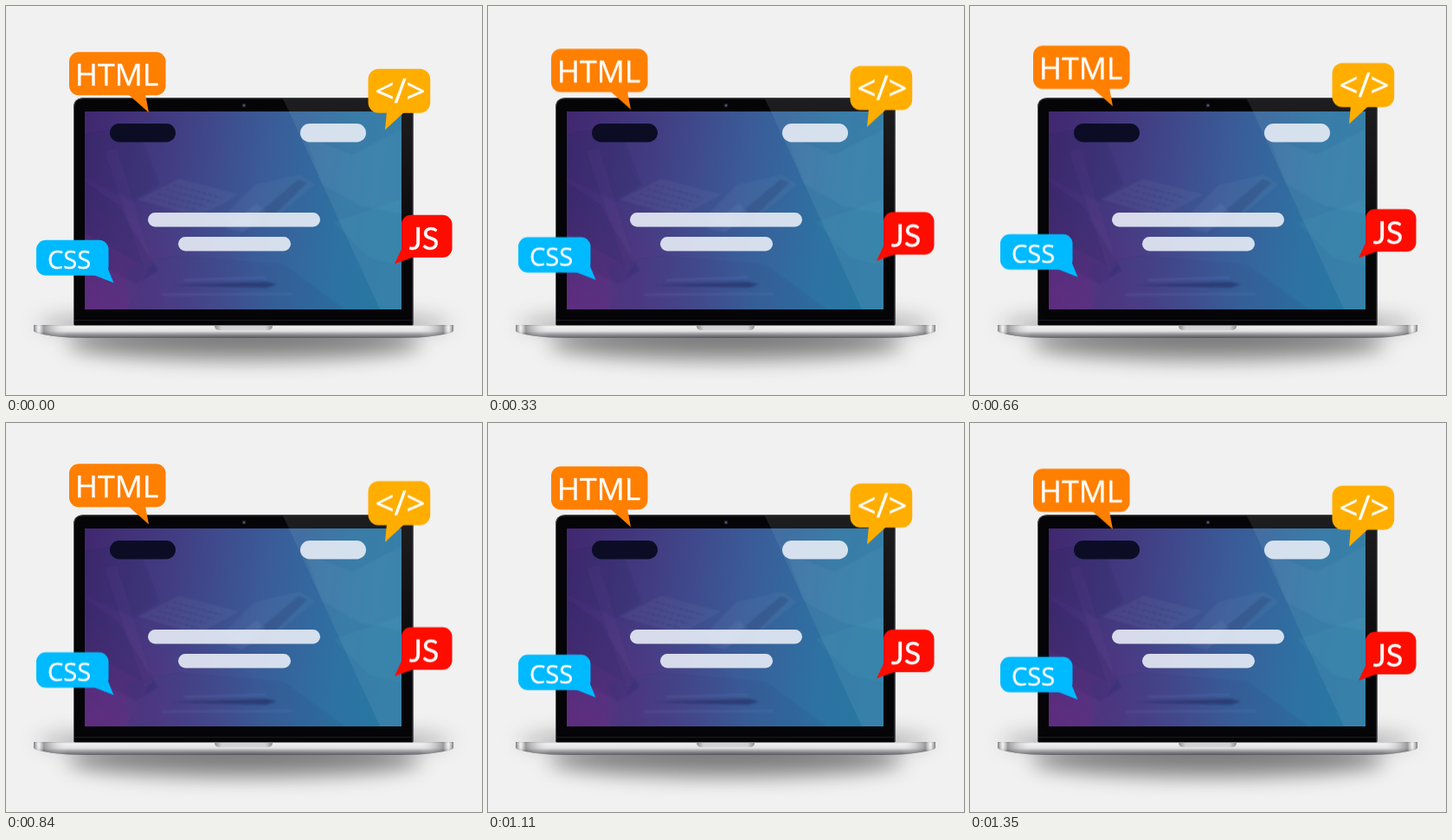
Recreate the animation shown at these times as an HTML page. Size 550 px wide and 450 px high, loop 1380 ms.

```html
<!DOCTYPE html>
<html lang="en">
<head>
<meta charset="utf-8">
<title>Web code laptop</title>
<style>
html, body { margin: 0; width: 100%; height: 100%; overflow: hidden; background: #f1f1f1; }
svg { display: block; width: 550px; height: 450px; }
text { fill: #fff; stroke: #fff; stroke-width: .4px; text-anchor: middle; font-family: "Open Sans", "Noto Sans", sans-serif; }
.js { font-family: Lato, sans-serif; }
/* 23 steps of 30 ms up, 23 down */
.bubble { animation: bob 1380ms infinite; }
@keyframes bob {
  0%, 100% { transform: translateY(0); animation-timing-function: steps(23); }
  50% { transform: translateY(var(--rise)); animation-timing-function: steps(23); }
}
</style>
</head>
<body>
<svg viewBox="0 0 550 450">
  <defs>
    <linearGradient id="tint" x1="0" y1="0" x2="1" y2=".08">
      <stop offset="0" stop-color="#41276f"/>
      <stop offset=".3" stop-color="#423e84"/>
      <stop offset=".6" stop-color="#3a5d99"/>
      <stop offset=".85" stop-color="#2d72a2"/>
      <stop offset="1" stop-color="#2877a3"/>
    </linearGradient>
    <radialGradient id="plum" cx="0" cy="1" r=".6">
      <stop offset="0" stop-color="#6b2c82" stop-opacity=".6"/>
      <stop offset="1" stop-color="#6b2c82" stop-opacity="0"/>
    </radialGradient>
    <linearGradient id="glare" x1="0" y1="0" x2="0" y2="1">
      <stop offset="0" stop-color="#fff" stop-opacity=".1"/>
      <stop offset=".45" stop-color="#fff" stop-opacity=".04"/>
      <stop offset=".75" stop-color="#fff" stop-opacity="0"/>
    </linearGradient>
    <linearGradient id="metal" x1="0" y1="0" x2="0" y2="1">
      <stop offset="0" stop-color="#bcbcbf"/>
      <stop offset=".12" stop-color="#f0f0f1"/>
      <stop offset=".48" stop-color="#dededf"/>
      <stop offset=".64" stop-color="#a8a8ac"/>
      <stop offset=".82" stop-color="#79797e"/>
      <stop offset="1" stop-color="#525258"/>
    </linearGradient>
    <linearGradient id="ends">
      <stop offset="0" stop-color="#55555a" stop-opacity=".75"/>
      <stop offset=".012" stop-color="#fff" stop-opacity=".5"/>
      <stop offset=".024" stop-color="#66666a" stop-opacity=".6"/>
      <stop offset=".08" stop-color="#fff" stop-opacity=".1"/>
      <stop offset=".5" stop-color="#fff" stop-opacity="0"/>
      <stop offset=".92" stop-color="#fff" stop-opacity=".1"/>
      <stop offset=".976" stop-color="#66666a" stop-opacity=".6"/>
      <stop offset=".988" stop-color="#fff" stop-opacity=".5"/>
      <stop offset="1" stop-color="#55555a" stop-opacity=".75"/>
    </linearGradient>
    <linearGradient id="notch">
      <stop offset="0" stop-color="#8e8e91"/>
      <stop offset=".12" stop-color="#d2d2d4"/>
      <stop offset=".88" stop-color="#d2d2d4"/>
      <stop offset="1" stop-color="#8e8e91"/>
    </linearGradient>
    <filter id="soft" x="-20%" y="-150%" width="140%" height="400%"><feGaussianBlur stdDeviation="11"/></filter>
    <filter id="haze" x="-20%" y="-20%" width="140%" height="140%"><feGaussianBlur stdDeviation="1.2"/></filter>
    <clipPath id="screen"><rect x="91" y="122" width="366" height="229"/></clipPath>
    <path id="deck" d="M32 369H517V376Q514 380 484 383Q470 384 440 384H109Q79 384 65 383Q35 380 32 376Z"/>
  </defs>

  <rect width="550" height="450" fill="#f1f1f1"/>

  <g filter="url(#soft)">
    <ellipse cx="275" cy="391" rx="205" ry="19" opacity=".43"/>
    <ellipse cx="275" cy="368" rx="240" ry="17" opacity=".25"/>
  </g>

  <!-- lid -->
  <path d="M78 370V118Q78 106.3 89.5 106.3H459Q470.5 106.3 470.5 118V370Z" fill="#050507"/>
  <path d="M78.5 369V118Q78.5 106.8 89.5 106.8H459Q470 106.8 470 118V369" fill="none" stroke="#4b4b50"/>
  <path d="M320 107.5H459Q469 107.5 469 118V369H457V122H327Z" fill="url(#glare)"/>
  <rect x="79" y="363" width="390" height="1" fill="#1c1c20"/>
  <circle cx="275" cy="115" r="2.3" fill="#27293a"/>
  <circle cx="275" cy="115" r="1" fill="#536080"/>

  <!-- desk scene -->
  <g clip-path="url(#screen)">
    <rect x="91" y="122" width="366" height="229" fill="url(#tint)"/>
    <rect x="91" y="122" width="366" height="229" fill="url(#plum)"/>
    <g filter="url(#haze)">
      <path d="M91 150L150 138L176 206L146 226L91 196Z" fill="#2b2763" opacity=".2"/>
      <path d="M91 205L130 232L176 306L150 322L91 290Z" fill="#2b1f5c" opacity=".22"/>
      <path d="M91 262L165 304L140 351H91Z" fill="#7b358c" opacity=".15"/>
      <path d="M114 168L128 165L170 300L160 306Z" fill="#8a5aa8" opacity=".08"/>
      <path d="M152 224L200 200L270 218L222 244Z" fill="#8797c6" opacity=".1"/>
      <g fill="none" stroke="#292d6c" stroke-width="2.4" stroke-dasharray="5 2" opacity=".32">
        <path d="M166 222L222 237M175 217L231 232M184 212L240 227M193 207L249 222"/>
      </g>
      <path d="M250 245L287 207L340 195L357 207L302 252L276 258Z" fill="#9bacd2" opacity=".08"/>
      <path d="M281 248L338 200L349 204L299 253Z" fill="#252f66" opacity=".22"/>
      <path d="M252 257L290 228L300 238L274 262Z" fill="#8994c6" opacity=".14"/>
      <path d="M345 150L400 172L457 142V240L410 232L365 206Z" fill="#75b1cc" opacity=".1"/>
      <path d="M378 250L457 224V300L420 292Z" fill="#4ba0be" opacity=".12"/>
      <path d="M140 300L196 290L320 300L390 351H140Z" fill="#223c7d" opacity=".15"/>
      <path d="M190 323L301 319L313 322L301 326Z" fill="#1c285d" opacity=".5"/>
      <path d="M206 317L300 314M180 334L330 333" stroke="#7b94c5" stroke-width="1.5" opacity=".25"/>
    </g>
    <path d="M327 122H457V351H432Z" fill="#9cc5d5" opacity=".12"/>
  </g>

  <rect x="120" y="136" width="76" height="21.5" rx="10.7" fill="#0c0d25"/>
  <g fill="#e6ecf6" opacity=".91">
    <rect x="340" y="136" width="76" height="21.5" rx="10.7"/>
    <rect x="164" y="239" width="199" height="16.5" rx="8.2"/>
    <rect x="199" y="267" width="130" height="16.5" rx="8.2"/>
  </g>

  <!-- base -->
  <use href="#deck" fill="url(#metal)"/>
  <use href="#deck" fill="url(#ends)"/>
  <path d="M79 369.5H470" stroke="#77777b"/>
  <path d="M241 370H308Q308 375 302 375H247Q241 375 241 370Z" fill="url(#notch)"/>

  <g class="bubble" style="--rise:-7.7px">
    <g fill="#ff7f00">
      <rect x="73" y="53.2" width="111.5" height="50" rx="11"/>
      <path d="M141 102L165 123.2L161 102Z"/>
    </g>
    <text x="128" y="91.7" font-size="35.5">HTML</text>
  </g>
  <g class="bubble" style="--rise:-7.1px">
    <g fill="#ffae00">
      <rect x="418.5" y="72.7" width="71.7" height="51" rx="12"/>
      <path d="M440 122L438 143.3L461 122Z"/>
    </g>
    <text x="455.5" y="111.5" font-size="38.5">&lt;/&gt;</text>
  </g>
  <g class="bubble" style="--rise:-7.1px">
    <g fill="#00baff">
      <rect x="35" y="270.8" width="83.5" height="41" rx="11"/>
      <path d="M101 311L124.5 320.3L117 302Z"/>
    </g>
    <text x="73" y="303.5" font-size="29">CSS</text>
  </g>
  <g class="bubble" style="--rise:-7.1px">
    <g fill="#ff0c00">
      <rect x="457" y="241.7" width="58.5" height="49.3" rx="11"/>
      <path d="M458 279L449 298.3L472 290Z"/>
    </g>
    <text class="js" x="483" y="281.7" font-size="36">JS</text>
  </g>
</svg>
</body>
</html>
```
